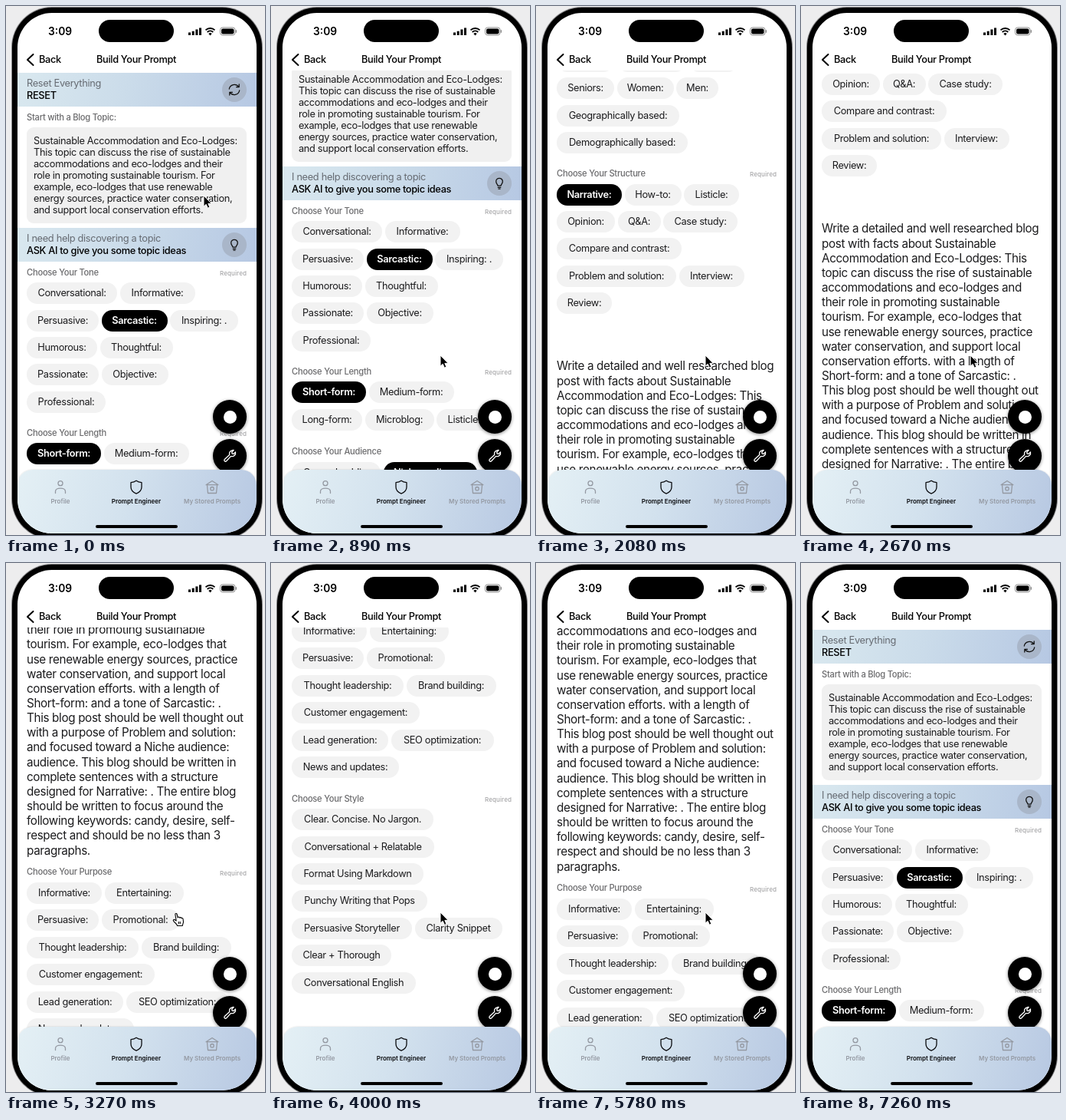
An HTML page that plays this animation: 338x689 px, repeating every 7.7 s.

```html
<!DOCTYPE html>
<html lang="en">
<head>
<meta charset="utf-8">
<title>Build Your Prompt</title>
<style>
html, body { margin: 0; width: 100%; height: 100%; overflow: hidden; background: #ededee; }
body { position: relative; font: 12.8px Inter, sans-serif; letter-spacing: -.33px; color: #1b1b1d; }
div, svg { position: absolute; }
#stage { left: 0; top: 0; width: 338px; height: 689px; overflow: hidden; }
.bezel { left: 8px; top: 2px; width: 326px; height: 692px; border-radius: 52px; background: #000; box-shadow: 0 0 0 1px #8b8b8d; }
.screen { inset: 0; background: #fff; clip-path: inset(9px 11px 2px 15px round 45px); }
.view { left: 0; top: 84px; width: 338px; height: 605px; overflow: hidden; }
#page { left: 0; top: -84px; width: 338px; }
.t { white-space: pre; line-height: 16px; margin-top: -8px; }
.m { font-weight: 500; color: #000; }
.title { left: 27px; font-size: 11.2px; font-weight: 500; letter-spacing: -.27px; color: #6c6c6e; }
.req { right: 24px; font-size: 8px; font-weight: 500; letter-spacing: .1px; color: #a6a6a8; }
.row { left: 27px; height: 28px; margin-top: -14px; display: flex; gap: 3.5px; }
.row span { flex: none; line-height: 28px; border-radius: 14px; background: #f2f2f2; text-align: center; white-space: pre; }
.row .on { background: #000; color: #fff; font-weight: 600; }
.banner { left: 15px; width: 312px; height: 44px; background: linear-gradient(100deg, #d9e8ef, #cbdcea 45%, #b6c8e3); }
.banner .t { left: 12px; }
.banner .sub { color: #666b72; }
.round { left: 267px; top: 6px; width: 32px; height: 32px; border-radius: 50%; background: #a9b6c9; }
.round svg { left: 7px; top: 7px; }
.box { left: 27px; top: 158px; width: 287px; height: 125px; border-radius: 9px; background: #f0f0f0; }
.box .text { left: 9px; top: 9.5px; line-height: 15.1px; white-space: pre; }
.para { left: 27px; margin-top: -9.6px; font-size: 15.26px; line-height: 19.15px; letter-spacing: -.357px; white-space: pre; }
.fab { left: 270px; width: 44px; height: 44px; border-radius: 50%; background: #000; box-shadow: 0 1px 4px #0007; }
.dot { left: 13.5px; top: 13.5px; width: 17px; height: 17px; border-radius: 50%; background: #fff; }
.tabs { left: 15px; top: 604px; width: 312px; height: 85px; border-radius: 20px 20px 0 0; background: linear-gradient(105deg, #e4f0f5, #d3e2ee 45%, #b7c8e2); box-shadow: 0 0 2px #0003; }
.tab { top: 13px; width: 100px; height: 40px; margin-left: -50px; color: #9499a2; }
.tab svg { left: 40px; top: 0; }
.tab .t { width: 100%; top: 28px; text-align: center; font-size: 8px; font-weight: 600; letter-spacing: 0; }
.tab.on { color: #0c0d10; }
.island { left: 121px; top: 18px; width: 98px; height: 29px; border-radius: 15px; background: #000; }
.home { left: 117px; top: 676px; width: 107px; height: 4px; border-radius: 2px; background: #000; }
.line { fill: none; stroke: currentColor; stroke-width: 1.3; stroke-linecap: round; stroke-linejoin: round; }
#cursor { left: 0; top: 0; width: 1px; height: 1px; }
#cursor svg { left: -5px; top: -3px; overflow: visible; }
</style>
</head>
<body>
<div id="stage">
  <div class="bezel"></div>
  <div class="screen">
    <div class="view"><div id="page">
      <div class="banner" style="top:87px">
        <div class="t sub" style="top:14px">Reset Everything</div>
        <div class="t m" style="top:30px">RESET</div>
        <div class="round"><svg class="line" width="18" height="18" style="color:#111"><path d="M2.3 8a6.8 6.8 0 0 1 12.3-2.6M15.7 10a6.8 6.8 0 0 1-12.3 2.6M15.2 2v3.6h-3.6M2.8 16v-3.6h3.6"/></svg></div>
      </div>
      <div class="t title" style="top:145px">Start with a Blog Topic:</div>
      <div class="box"><div class="text">Sustainable Accommodation and Eco-Lodges:
This topic can discuss the rise of sustainable
accommodations and eco-lodges and their
role in promoting sustainable tourism. For
example, eco-lodges that use renewable
energy sources, practice water conservation,
and support local conservation efforts.</div></div>
      <div class="banner" style="top:289px">
        <div class="t sub" style="top:14px">I need help discovering a topic</div>
        <div class="t m" style="top:30px">ASK AI to give you some topic ideas</div>
        <div class="round"><svg class="line" width="18" height="18" style="color:#111"><path d="M7 12.2C7 10.400 4.700 9.600 4.700 6.600a4.300 4.300 0 0 1 8.600 0C13.300 9.600 11 10.400 11 12.200ZM7.300 14.400h3.400M8 16.200h2"/></svg></div>
      </div>
    </div></div>

    <div class="t" style="left:55px;top:33px;font-size:13.8px;font-weight:600;letter-spacing:0;color:#000">3:09</div>
    <div class="island"></div>
    <svg width="64" height="14" style="left:238px;top:26px">
      <path d="M1.500 12V8.500M6.200 12V6.800M10.900 12V4.500M15.500 12V2.500" stroke="#000" stroke-width="3"/>
      <path d="M22.500 5.400a8.800 8.800 0 0 1 12 0M24.700 8a5.600 5.600 0 0 1 7.600 0" fill="none" stroke="#000" stroke-width="1.900"/>
      <path d="M28.500 12.500l-2.200-2.400a3.300 3.300 0 0 1 4.400 0Z"/>
      <rect x="41.500" y="2" width="19.500" height="10" rx="3.200" fill="none" stroke="#8d8d8d"/>
      <rect x="43" y="3.500" width="16.500" height="7" rx="2"/>
      <path d="M62.300 5.300v3.400" stroke="#8d8d8d" stroke-width="1.400"/>
    </svg>
    <svg class="line" width="12" height="18" style="left:26px;top:61px;color:#000;stroke-width:2"><path d="M9.500 2 2 9l7.500 7"/></svg>
    <div class="t m" style="left:43px;top:70px">Back</div>
    <div class="t m" style="left:0;width:340px;top:70px;text-align:center">Build Your Prompt</div>

    <div class="fab" style="top:513px"><div class="dot"></div></div>
    <div class="fab" style="top:564px"><svg class="line" width="20" height="20" style="left:12px;top:12px;color:#fff"><path d="M12.300 3.200a4.500 4.500 0 0 1 2.800-.7L12.700 5l.4 2 2 .4 2.400-2.400a4.600 4.600 0 0 1-6 5.400L5.600 16.700a1.600 1.600 0 0 1-2.300-2.300L9.700 8.500a4.600 4.600 0 0 1 2.600-5.300Z"/></svg></div>

    <div class="tabs">
      <div class="tab" style="left:56px"><svg class="line" width="20" height="20"><circle cx="10" cy="4.700" r="3"/><path d="M3.500 17.500v-2.300c0-5.500 13-5.500 13 0v2.300"/></svg><div class="t">Profile</div></div>
      <div class="tab on" style="left:155px"><svg class="line" width="20" height="20"><path d="M10 1.200c2.200 1.600 4.500 2.200 7 2.400v6c0 4-2.800 7-7 8.600-4.200-1.600-7-4.600-7-8.600v-6c2.500-.2 4.800-.8 7-2.400Z"/></svg><div class="t">Prompt Engineer</div></div>
      <div class="tab" style="left:254px"><svg class="line" width="20" height="20"><path d="M2 6.700 10 1.500l8 5.200ZM3.500 7l1 10.500h11l1-10.500"/><circle cx="10" cy="11.700" r="2.200"/></svg><div class="t">My Stored Prompts</div></div>
    </div>
    <div class="home"></div>
  </div>
  <div id="cursor">
    <svg id="arrow" width="20" height="24"><path transform="translate(5 3)" d="M0 0V14.200L3.200 11.300 5.400 16.200 7.900 15.100 5.800 10.400H10.200Z" stroke="#fff"/></svg>
    <svg id="hand" width="20" height="24"><path transform="translate(1 4)" d="M5.200 10 3.900 1.900C3.700.3 5.700 0 6.100 1.500L7.200 6c.2-1.400 2.200-1.300 2.400.2.500-1 2-.8 2.200.5.700-.7 2-.3 2.200.9l.5 3.600c.1 1.700-.9 2.800-1.200 5.300H6.700C6 14 3.300 12.500 1.600 10.300.6 8.900 2.200 8 3.300 8.700ZM8.300 11v3.200M10.300 11v3.200" fill="#fff" stroke="#000" stroke-width="1.100" stroke-linejoin="round"/></svg>
  </div>
</div>
<script>
const LOOP = 7700, STEPS = 52, TICK = LOOP / STEPS;
const $ = id => document.getElementById(id);
const page = $('page');

// Each chip is "label width"; a star marks the chosen one.
const sections = [
  [346.5, 'Tone', ['Conversational: 118, Informative: 98', 'Persuasive: 94,*Sarcastic: 86, Inspiring: . 89',
    'Humorous: 92, Thoughtful: 95', 'Passionate: 94, Objective: 87', 'Professional: 103']],
  [555.8, 'Length', ['*Short-form: 97, Medium-form: 111', 'Long-form: 92, Microblog: 90, Listicle: 72']],
  [660, 'Audience', ['General public: 116,*Niche audience: 122', 'Experts: 75, Beginners: 90, Youth: 65',
    'Seniors: 75, Women: 74, Men: 55', 'Geographically based: 160', 'Demographically based: 171']],
  [869, 'Structure', ['*Narrative: 85, How-to: 74, Listicle: 72', 'Opinion: 76, Q&A: 56, Case study: 97',
    'Compare and contrast: 163', 'Problem and solution: 156, Interview: 85', 'Review: 72']],
  [1531.3, 'Purpose', ['Informative: 98, Entertaining: 103', 'Persuasive: 94, Promotional: 102',
    'Thought leadership: 146, Brand building: 117', 'Customer engagement: 167',
    'Lead generation: 126, SEO optimization: 134', 'News and updates: 140']],
  [1776.5, 'Style', ['Clear. Concise. No Jargon. 185', 'Conversational + Relatable 186', 'Format Using Markdown 172',
    'Punchy Writing that Pops 177', 'Persuasive Storyteller 157, Clarity Snippet 114', 'Clear + Thorough 130',
    'Conversational English 162']]
];

const prompt = `Write a detailed and well researched blog
post with facts about Sustainable
Accommodation and Eco-Lodges: This
topic can discuss the rise of sustainable
accommodations and eco-lodges and
their role in promoting sustainable
tourism. For example, eco-lodges that
use renewable energy sources, practice
water conservation, and support local
conservation efforts. with a length of
Short-form: and a tone of Sarcastic: .
This blog post should be well thought out
with a purpose of Problem and solution:
and focused toward a Niche audience:
audience. This blog should be written in
complete sentences with a structure
designed for Narrative: . The entire blog
should be written to focus around the
following keywords: candy, desire, self-
respect and should be no less than 3
paragraphs.`;

function add(cls, top, text = '') {
  const el = document.createElement('div');
  el.className = cls;
  el.style.top = top + 'px';
  el.textContent = text;
  return page.appendChild(el);
}

function addChip(row, spec) {
  const [, star, label, width] = spec.trim().match(/^(\*?)(.+) (\d+)$/);
  const chip = document.createElement('span');
  chip.textContent = label;
  chip.style.width = width + 'px';
  if (star) chip.className = 'on';
  row.appendChild(chip);
}

for (const [y, name, rows] of sections) {
  add('t title', y, 'Choose Your ' + name);
  add('t req', y + 1.2, 'Required');
  rows.forEach((chips, i) => {
    const row = add('row', y + 27.6 + i * 35.4);
    chips.split(',').forEach(spec => addChip(row, spec));
  });
}
add('para', 1120, prompt);
add('para', 2099, prompt);

// Key poses: [step, value, ...], linear in between.
const scrollKeys = [[4, 0], [7, 120], [10, 325], [14, 651], [16, 770], [18, 830], [19, 830], [22, 1129],
  [27, 1470], [32, 1719], [35, 1910], [36, 1860], [37, 1700], [39, 1108], [41, 430], [42, 150], [43, 0]];
const cursorKeys = [[0, 258, 247], [1, 250, 300], [2, 231, 405], [3, 221, 455],
  [45, 221, 455], [46, 232, 490], [47, 268, 575], [48, 309, 678], [49, 360, 720]];

function pose(keys, k) {
  if (k <= keys[0][0]) return keys[0].slice(1);
  const i = keys.findIndex(key => key[0] >= k);
  if (i < 0) return keys[keys.length - 1].slice(1);
  const a = keys[i - 1], b = keys[i], f = (k - a[0]) / (b[0] - a[0]);
  return a.slice(1).map((v, n) => Math.round(v + (b[n + 1] - v) * f));
}

const start = performance.now();
function draw() {
  const t = (performance.now() - start) % LOOP;
  const k = Math.floor((t + 8) / TICK) % STEPS;
  const [y] = pose(scrollKeys, k);
  const [cx, cy] = pose(cursorKeys, k);
  const hand = k === 22 || k === 23;
  page.style.transform = `translateY(${-y}px)`;
  $('cursor').style.transform = `translate(${cx}px, ${cy}px)`;
  $('hand').style.display = hand ? '' : 'none';
  $('arrow').style.display = hand ? 'none' : '';
  requestAnimationFrame(draw);
}
draw();
</script>
</body>
</html>
```
